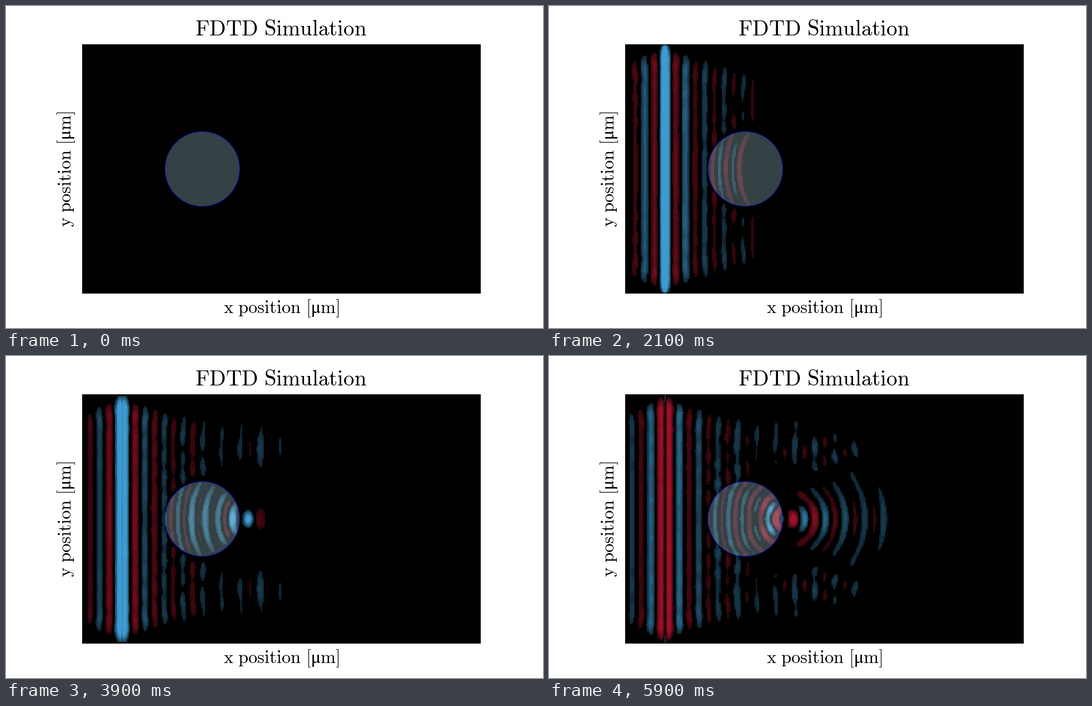
A matplotlib script that plays this animation: 966 by 580 pixels, repeating every 6 s.

```python
import numpy as np
import matplotlib.pyplot as plt
from matplotlib.animation import FuncAnimation
from matplotlib.patches import Circle

W, H, DPI = 966, 580, 100
LEFT, RIGHT, TOP, BOTTOM = 137, 854, 69, 518
FRAMES, INTERVAL = 60, 100

# Grid in cells; y and z hold one half only, mirrored at index 1
NX, NY, NZ = 250, 102, 48
COURANT = 0.505
STEPS, LEAD = 7, 4            # steps per frame, extra steps before the first
PERIOD = 30.63                # steps per oscillation
LINE_X = 32
BALL_X, BALL_R, BALL_EPS = 96.5, 30, 2.0

FULL_SCALE = 0.185
LEVEL = 0.06
PEAK = 0.85
BLUE_MIN, RED_MIN = 0.19, 0.23
BLUE = np.array([74, 182, 246]) / 255
RED = np.array([185, 22, 46]) / 255


def ramp(depth, width, peak):
    """Quadratic damping that grows with depth inside an absorbing layer."""
    return peak * np.clip(depth / width, 0, 1) ** 2


def build_medium():
    x = np.arange(NX)[:, None, None]
    y = np.arange(NY - 2)[None, :, None]
    z = np.arange(NZ - 2)[None, None, :]
    inside = (x - BALL_X) ** 2 + y ** 2 + z ** 2 <= BALL_R ** 2
    eps = np.where(inside, BALL_EPS, 1.0)
    damp = (ramp(10 - x, 10, 0.25) + ramp(y - 86, 14, 0.2)
            + ramp(z - (NZ - 17), 15, 0.15))
    return eps.astype(np.float32), (1 / (1 + damp)).astype(np.float32)


def step(now, old, gain, keep, n):
    """Advance the wave equation by one step; the result lands in old."""
    hi = min(NX - 1, int(LINE_X + 0.55 * n + 12))
    mid = slice(1, -1)
    c = now[1:hi, mid, mid]
    o = old[1:hi, mid, mid]
    lap = now[:hi - 1, mid, mid] + now[2:hi + 1, mid, mid]
    lap += now[1:hi, :-2, mid]
    lap += now[1:hi, 2:, mid]
    lap += now[1:hi, mid, :-2]
    lap += now[1:hi, mid, 2:]
    lap -= 6 * c
    lap *= gain[1:hi]
    lap += 2 * (c - o)
    lap *= keep[1:hi]
    o += lap
    # The emitter is three cells thick in z
    drive = -np.sin(2 * np.pi * (n + 0.4) / PERIOD)
    old[LINE_X, 1:-1, 1:3] += COURANT ** 2 * drive / 3
    old[:hi, 0] = old[:hi, 2]
    old[:hi, :, 0] = old[:hi, :, 2]
    return old, now


def colorize(field):
    """Blue for positive, red for negative, in flat levels above black."""
    v = field / FULL_SCALE
    mag = np.minimum(PEAK, np.round(np.abs(v) / LEVEL) * LEVEL)
    mag[(v < BLUE_MIN) & (v > -RED_MIN)] = 0
    return mag[..., None] * np.where(v[..., None] > 0, BLUE, RED)


def simulate():
    eps, keep = build_medium()
    gain = COURANT ** 2 / eps
    weight = np.sqrt(eps[:, :, 0])
    now = np.zeros((NX, NY, NZ), np.float32)
    old = np.zeros_like(now)
    n, images = 0, []
    for k in range(FRAMES):
        end = STEPS * k + LEAD if k else 0
        while n < end:
            now, old = step(now, old, gain, keep, n)
            n += 1
        half = now[:, 1:-1, 1] * weight
        plane = np.concatenate([half[:, :0:-1], half], axis=1).T
        images.append(colorize(plane))
    return images


def label(x, y, words, px, **kw):
    body = words.replace(" ", r"\ ")
    fig.text(x / W, 1 - y / H, rf"$\mathrm{{{body}}}$", fontsize=px * 72 / DPI,
             ha="center", va="baseline", rotation_mode="anchor", **kw)


plt.rcParams["mathtext.fontset"] = "cm"
images = simulate()

fig = plt.figure(figsize=(W / DPI, H / DPI), dpi=DPI, facecolor="white")
ax = fig.add_axes([LEFT / W, 1 - BOTTOM / H,
                   (RIGHT - LEFT) / W, (BOTTOM - TOP) / H])
ax.set_facecolor("black")
ax.spines[:].set_visible(False)
rows = images[0].shape[0] / 2
picture = ax.imshow(images[0], extent=(-0.5, NX - 0.5, -rows, rows),
                    interpolation="nearest", aspect="auto")
ax.set(xlim=(0, 320), ylim=(-100, 100), xticks=[], yticks=[])
ax.add_patch(Circle((BALL_X, 0), BALL_R, facecolor=(0.68, 0.85, 0.9, 0.3),
                    edgecolor=(0, 0, 1, 0.5), linewidth=1.0))

label(494, 53, "FDTD Simulation", 38.9)
label(495.5, 553, "x position [μm]", 32.5)
label(117, 293.5, "y position [μm]", 32.5, rotation=90)


def update(k):
    picture.set_data(images[k])
    return [picture]


anim = FuncAnimation(fig, update, frames=FRAMES, interval=INTERVAL,
                     repeat=True, repeat_delay=0)
plt.show()
```
